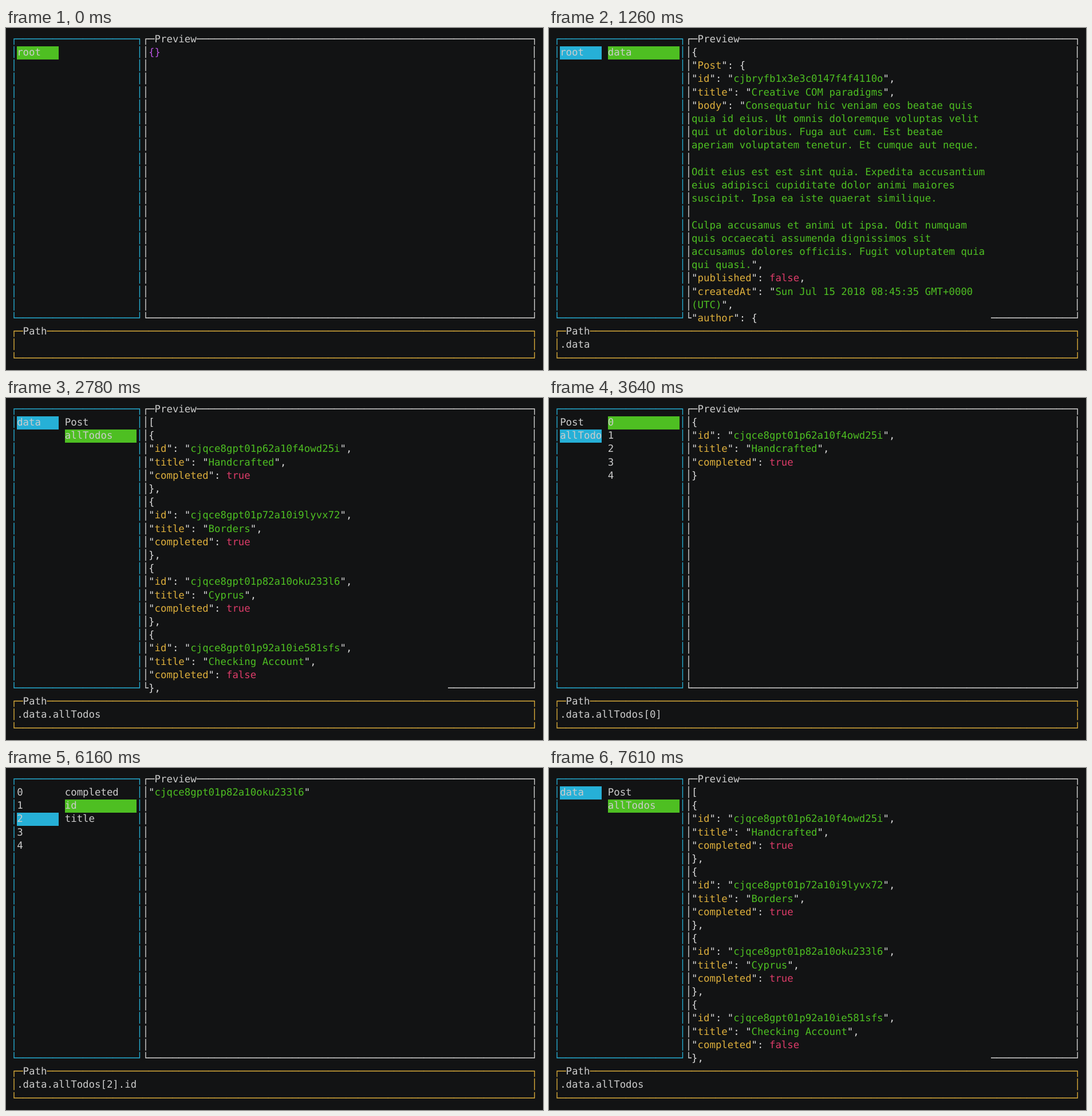
Write an HTML page that moves like this. It is 938 px wide and 597 px high and loops after 8000 ms.

```html
<!DOCTYPE html>
<html lang="en">
<head>
<meta charset="utf-8">
<title>JSON explorer</title>
<style>
  html, body { margin: 0; width: 100%; height: 100%; overflow: hidden; background: #121314; }
  #stage { position: relative; width: 938px; height: 597px; overflow: hidden; background: #121314; }
  pre, .bar { position: absolute; margin: 0; }
  pre {
    font: 17.36px/23.2px "DejaVu Sans Mono", monospace;
    text-rendering: geometricPrecision;
    font-variant-ligatures: none;
    white-space: pre;
    color: #ccc;
  }
  .bar { height: 23.2px; }
  .state { visibility: hidden; }
  .state.on { visibility: visible; }
  .blue { color: #26b0d7; }
  .white { color: #d9d9d9; }
  .yellow { color: #ddaf3c; }
  .green { color: #4ebf22; }
  .red { color: #dd3c69; }
  .magenta { color: #b954e1; }
</style>
</head>
<body>
<div id="stage"></div>
<script>
const CELL = 10.4516, LINE = 23.2, LEFT = 8.7, TOP = 8.6, DROP = 0.2, LOOP = 8000;
const GREEN = '#4ebf22', BLUE = '#26b0d7', BACK = '#121314';
const stage = document.getElementById('stage');

function add(parent, tag, cls, x, y) {
  const el = document.createElement(tag);
  el.className = cls;
  el.style.left = x + 'px';
  el.style.top = y + 'px';
  return parent.appendChild(el);
}

function text(parent, col, row, html, cls = '', dx = 0) {
  add(parent, 'pre', cls, LEFT + col * CELL + dx, TOP + row * LINE + DROP).innerHTML = html;
}

function bar(parent, col, row, cols, color) {
  const el = add(parent, 'div', 'bar', LEFT + col * CELL, TOP + row * LINE);
  el.style.width = cols * CELL + 'px';
  el.style.background = color;
}

function frame(col, row, cols, rows, cls, title = '', right = '│') {
  const inner = cols - 2;
  const head = title ? `─<span style="color:#ccc">${title}</span>` : '';
  const rest = '─'.repeat(inner - (title ? title.length + 1 : 0));
  const side = '│' + ' '.repeat(inner) + right + '\n';
  text(stage, col, row,
    `┌${head}${rest}┐\n${side.repeat(rows - 2)}└${'─'.repeat(inner)}┘`, cls);
}

const span = (cls, s) => `<span class="${cls}">${s}</span>`;

// Colours JSON: keys, strings, booleans; punctuation keeps the base colour.
function paint(json) {
  return json.replace(/"([^"]*)"(:?)|\b(true|false)\b|\{\}/g, (all, str, colon, bool) => {
    if (bool) return span('red', bool);
    if (str === undefined) return span('magenta', all);
    return `"${span(colon ? 'yellow' : 'green', str)}"${colon}`;
  });
}

const todo = (id, title, done) => `{
"id": "cjqce8gpt01p${id}",
"title": "${title}",
"completed": ${done}
}`;

const todos = [
  todo('62a10f4owd25i', 'Handcrafted', true),
  todo('72a10i9lyvx72', 'Borders', true),
  todo('82a10oku233l6', 'Cyprus', true),
  todo('92a10ie581sfs', 'Checking Account', false)
];
const allTodos = '[\n' + todos.join(',\n') + ',';

const post = `{
"id": "cjbryfb1x3e3c0147f4f4110o",
"title": "Creative COM paradigms",
"body": "Consequatur hic veniam eos beatae quis
quia id eius. Ut omnis doloremque voluptas velit
qui ut doloribus. Fuga aut cum. Est beatae
aperiam voluptatem tenetur. Et cumque aut neque.

Odit eius est est sint quia. Expedita accusantium
eius adipisci cupiditate dolor animi maiores
suscipit. Ipsa ea iste quaerat similique.

Culpa accusamus et animi ut ipsa. Odit numquam
quis occaecati assumenda dignissimos sit
accusamus dolores officiis. Fugit voluptatem quia
qui quasi.",
"published": false,
"createdAt": "Sun Jul 15 2018 08:45:35 GMT+0000
(UTC)",
"author": {
"id": "cjqce8gps01p52a10vxue5t2v",`;
const data = '{\n"Post": ' + post;
const root = '{\n"data": ' + data;

const keys = ['Post', 'allTodos'];
const nums = ['0', '1', '2', '3', '4'];
const fields = ['completed', 'id', 'title'];

// start, left list, left pick, right list, right pick, path, preview
const states = [
  [0, ['root'], 0, null, 0, '', '{}'],
  [660, ['root'], 0, null, 0, '.', root],
  [1260, ['root'], 0, ['data'], 0, '.data', data],
  [2120, ['data'], 0, keys, 0, '.data.Post', post],
  [2780, ['data'], 0, keys, 1, '.data.allTodos', allTodos],
  [3640, keys, 1, nums, 0, '.data.allTodos[0]', todos[0]],
  [4240, keys, 1, nums, 1, '.data.allTodos[1]', todos[1]],
  [4640, keys, 1, nums, 2, '.data.allTodos[2]', todos[2]],
  [5430, nums, 2, fields, 0, '.data.allTodos[2].completed', 'true'],
  [6160, nums, 2, fields, 1, '.data.allTodos[2].id', '"cjqce8gpt01p82a10oku233l6"'],
  [6620, nums, 2, fields, 2, '.data.allTodos[2].title', '"Cyprus"'],
  [7080, keys, 1, nums, 2, '.data.allTodos[2]', todos[2]],
  [7610, ['data'], 0, keys, 1, '.data.allTodos', allTodos]
];

function list(parent, col, width, items, pick, color) {
  bar(parent, col, 1 + pick, width, color);
  text(parent, col, 1, items.map(s => s.slice(0, width)).join('\n'));
}

function build([, left, leftPick, right, rightPick, path, json]) {
  const el = add(stage, 'div', 'state', 0, 0);
  list(el, 1, 7, left, leftPick, right ? BLUE : GREEN);
  if (right) list(el, 9, 12, right, rightPick, GREEN);
  text(el, 1, 23, path);

  const lines = json.split('\n');
  const full = Math.min(lines.length, 20);
  // A long preview spills over the lower border.
  if (lines.length > 20) bar(el, 23, 21, 50, BACK);
  text(el, 23, 1, paint(lines.slice(0, 21).join('\n')), 'white');

  // The right border sits slightly further left beside filled rows.
  text(el, 87, 1, '│\n'.repeat(full), 'white', -0.5);
  text(el, 87, 1 + full, '│\n'.repeat(20 - full), 'white');
  return el;
}

frame(0, 0, 22, 22, 'blue');
frame(22, 0, 66, 22, 'white', 'Preview', ' ');
frame(0, 22, 88, 3, 'yellow', 'Path');
const views = states.map(build);

let shown = -1;
function tick() {
  const t = performance.now() % LOOP;
  let now = 0;
  while (now + 1 < states.length && states[now + 1][0] <= t) now++;
  if (now !== shown) {
    views.forEach((v, i) => v.classList.toggle('on', i === now));
    shown = now;
  }
  requestAnimationFrame(tick);
}
tick();
</script>
</body>
</html>
```
